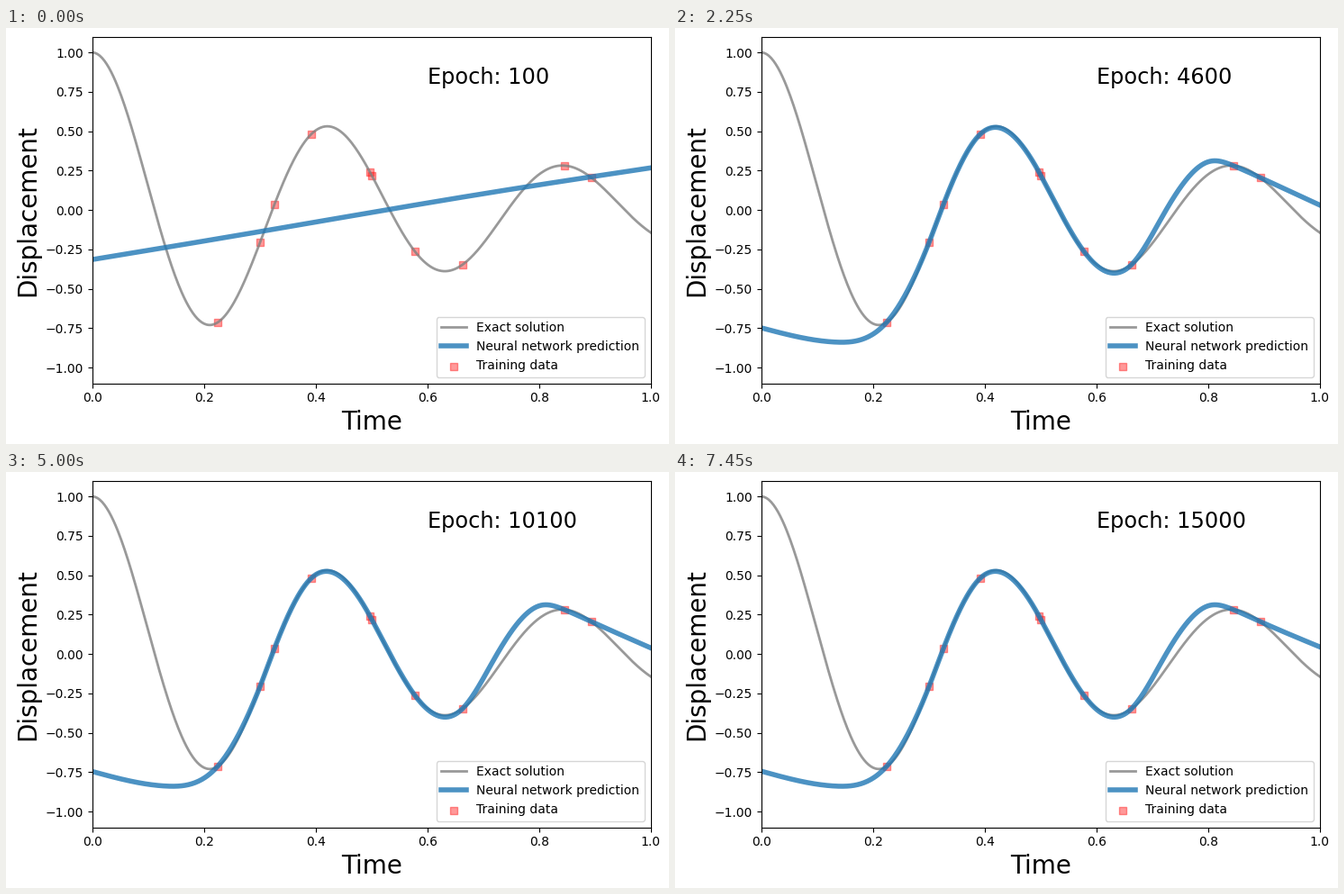
A matplotlib script for the animation above (8 s loop, 736 px wide and 462 px high).

```python
import numpy as np
import matplotlib.pyplot as plt
from matplotlib.animation import FuncAnimation

WIDTH, HEIGHT, DPI = 736, 462, 100
AXES_WIDTH, AXES_HEIGHT, MARGIN = 620, 385, 10
FRAMES, INTERVAL = 160, 50
EPOCH_STEP, LAST_EPOCH, FITTED_EPOCH = 100, 15000, 1500
DAMPING, OMEGA0 = 1.5, 15.0

t = np.linspace(0, 1, 500)
t_data = np.array([.2242, .3005, .3265, .392, .497, .501, .578, .663, .845, .8935])


def oscillator(t):
    """Underdamped oscillator released from rest at 1."""
    omega = np.sqrt(OMEGA0**2 - DAMPING**2)
    phase = np.arctan(-DAMPING / omega)
    return np.exp(-DAMPING * t) * np.cos(phase + omega * t) / np.cos(phase)


def spline(x, y):
    """Natural cubic spline through the knots, sampled on t."""
    h, n = np.diff(x), len(x)
    matrix, rhs = np.eye(n), np.zeros(n)
    for i in range(1, n - 1):
        matrix[i, i - 1:i + 2] = h[i - 1], 2 * (h[i - 1] + h[i]), h[i]
        rhs[i] = 6 * ((y[i + 1] - y[i]) / h[i] - (y[i] - y[i - 1]) / h[i - 1])
    m = np.linalg.solve(matrix, rhs)
    k = np.clip(np.searchsorted(x, t, side="right") - 1, 0, n - 2)
    a, b, hk = x[k + 1] - t, t - x[k], h[k]
    return ((m[k] * a**3 + m[k + 1] * b**3) / (6 * hk)
            + (y[k] / hk - m[k] * hk / 6) * a
            + (y[k + 1] / hk - m[k + 1] * hk / 6) * b)


def fitted(progress):
    """Curve through the training data, with slowly drifting ends."""
    free = [(0, -.749 + .006 * progress), (.135, -.838), (.417, .525), (.63, -.4),
            (.72, -.03), (.803, .309), (1, .026 + .02 * progress)]
    knots = sorted(free + list(zip(t_data, oscillator(t_data))))
    return spline(*np.array(knots).T)


def prediction(epoch):
    s = np.clip((epoch - EPOCH_STEP) / (FITTED_EPOCH - EPOCH_STEP), 0, 1)
    learned = s * s * (3 - 2 * s)
    first = (-.314 + .582 * t + .008 * np.sin(np.pi * t)
             - .004 * np.sin(2 * np.pi * t))
    # The end without data overshoots while the fit steepens.
    dip = .65 * np.sin(np.pi * learned) * np.clip(1 - t / t_data[0], 0, 1) ** 2
    return first + learned * (fitted(epoch / LAST_EPOCH) - first) - dip


def place_axes(left, bottom):
    ax.set_position([left / WIDTH, bottom / HEIGHT,
                     AXES_WIDTH / WIDTH, AXES_HEIGHT / HEIGHT])


plt.rcParams["font.family"] = "DejaVu Sans"
fig = plt.figure(figsize=(WIDTH / DPI, HEIGHT / DPI), dpi=DPI)
ax = fig.add_subplot()

ax.plot(t, oscillator(t), color="grey", lw=2, alpha=.8, label="Exact solution")
fit_line, = ax.plot(t, prediction(EPOCH_STEP), color="tab:blue", lw=4, alpha=.8,
                    label="Neural network prediction")
ax.scatter(t_data, oscillator(t_data), color="red", marker="s", alpha=.4,
           label="Training data")
epoch_text = ax.text(.6, .8, "", fontsize="xx-large")
ax.set_xlim(0, 1)
ax.set_ylim(-1.1, 1.1)
ax.set_xlabel("Time", fontsize=20)
ax.set_ylabel("Displacement", fontsize=20)
ax.legend(loc="lower right")

# Leave an even margin outside the axis labels.
place_axes(96, 67)
labels = fig.get_tightbbox()
place_axes(96 - labels.x0 * DPI + MARGIN, 67 - labels.y0 * DPI + MARGIN)


def update(frame):
    epoch = min((frame + 1) * EPOCH_STEP, LAST_EPOCH)
    fit_line.set_ydata(prediction(epoch))
    epoch_text.set_text(f"Epoch: {epoch}")
    return fit_line, epoch_text


animation = FuncAnimation(fig, update, frames=FRAMES, interval=INTERVAL,
                          repeat=True, repeat_delay=0)
plt.show()
```
